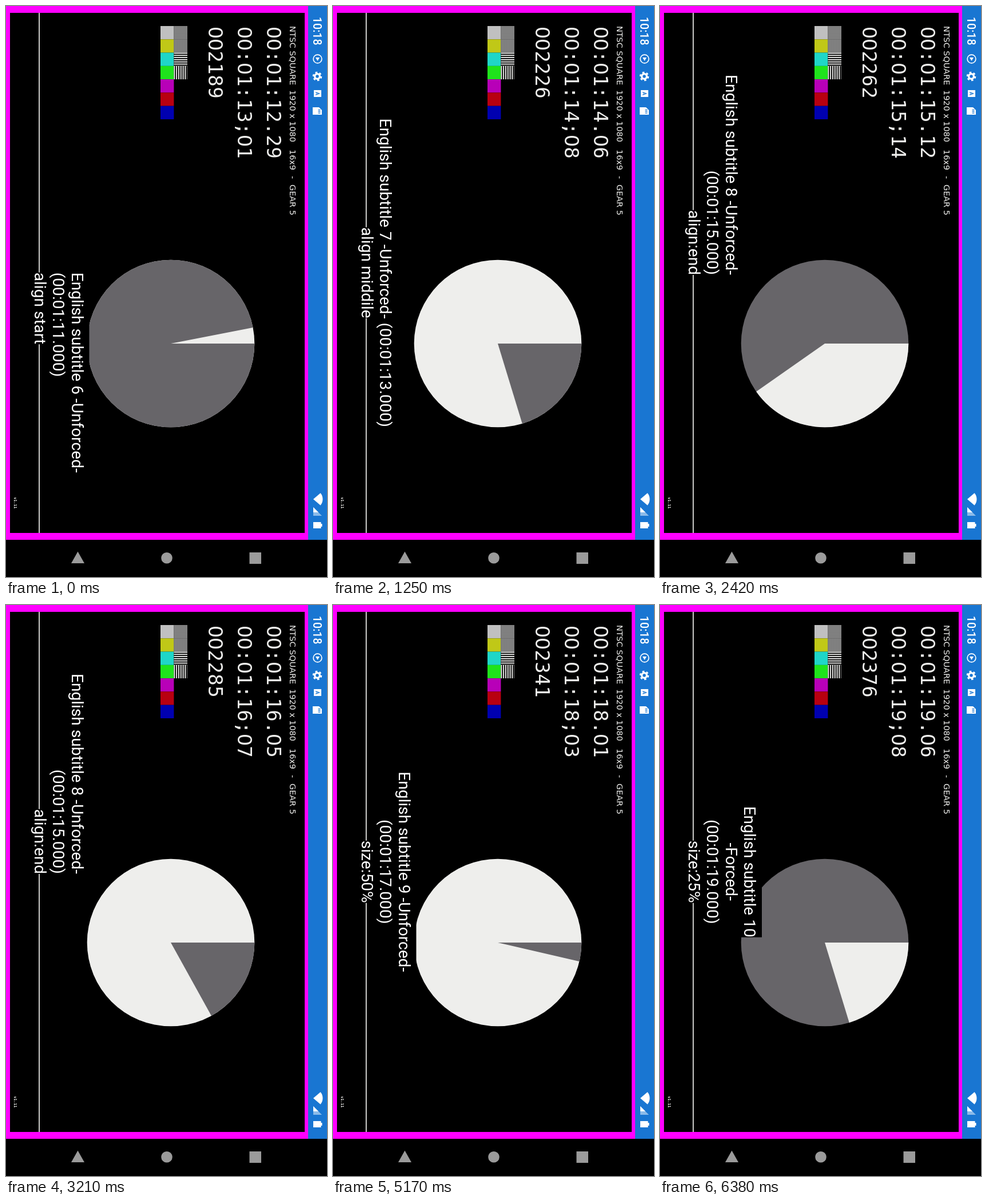
Recreate the animation shown at these times as an HTML page with a canvas. Size 561 by 998 pixels, loop 6.42 s.

```html
<!DOCTYPE html>
<html>
<head>
<meta charset="utf-8">
<style>
  html, body { margin: 0; width: 561px; height: 998px; overflow: hidden; background: #000; }
  canvas { display: block; }
</style>
</head>
<body>
<canvas id="stage" width="561" height="998"></canvas>
<script>
const ctx = document.getElementById('stage').getContext('2d');
const LOOP = 6420, TAU = Math.PI * 2;
const PALE = '#eeeeec', GREY = '#676569', BLUE = '#1976d2', NAV = '#9b9b9b';
const SANS = '"DejaVu Sans", sans-serif', MONO = '"DejaVu Sans Mono", monospace';

// Playback pace: time in ms, video frame number
const pace = [[0, 2189], [1250, 2226], [2420, 2262], [3210, 2285],
  [4340, 2315], [5170, 2341], [6380, 2376], [6420, 2377]];

// Subtitles change every two seconds of video, starting at 71 s
const subtitles = [
  { align: 'left', lines: ['English subtitle 6 -Unforced-', '(00:01:11.000)', 'align start'] },
  { align: 'center', lines: ['English subtitle 7 -Unforced- (00:01:13.000)', 'align middile'] },
  { align: 'right', lines: ['English subtitle 8 -Unforced-', '(00:01:15.000)', 'align:end'] },
  { align: 'center', lines: ['English subtitle 9 -Unforced-', '(00:01:17.000)', 'size:50%'] },
  { align: 'center', lines: ['English subtitle 10', '-Forced-', '(00:01:19.000)', 'size:25%'] }
];

function box(x, y, w, h, color) {
  ctx.fillStyle = color;
  ctx.fillRect(x, y, w, h);
}

function shape(color, ...points) {
  ctx.fillStyle = color;
  ctx.beginPath();
  points.forEach(p => ctx.lineTo(...p));
  ctx.fill();
}

function disc(x, y, r, color, from = 0, to = TAU) {
  ctx.fillStyle = color;
  ctx.beginPath();
  if (to - from < TAU) ctx.moveTo(x, y);
  ctx.arc(x, y, r, from, to);
  ctx.fill();
}

function ring(x, y, r, width, color, dash = []) {
  ctx.strokeStyle = color;
  ctx.lineWidth = width;
  ctx.setLineDash(dash);
  ctx.beginPath();
  ctx.arc(x, y, r, 0, TAU);
  ctx.stroke();
  ctx.setLineDash([]);
}

// Text reads downwards: x is its baseline, y its anchor
function text(str, x, y, font, color = PALE, align = 'left') {
  ctx.save();
  ctx.transform(0, 1, -1, 0, x, y);
  ctx.font = font;
  ctx.fillStyle = color;
  ctx.textAlign = align;
  ctx.fillText(str, 0, 0);
  ctx.restore();
}

// Monospaced figures, but with a plain zero
function counter(str, x) {
  [...str].forEach((c, i) =>
    text(c, x, 46.5 + i * 21, '34px ' + (c === '0' ? SANS : MONO), PALE, 'center'));
}

function timecode(n, mark) {
  const pad = v => String(v).padStart(2, '0');
  const s = Math.floor(n / 30);
  return `00:${pad(Math.floor(s / 60))}:${pad(s % 60)}${mark}${pad(n % 30)}`;
}

function frameAt(t) {
  const i = Math.max(1, pace.findIndex(p => p[0] > t));
  const [t0, n0] = pace[i - 1], [t1, n1] = pace[i];
  return Math.floor(n0 + (n1 - n0) * (t - t0) / (t1 - t0) + 0.01);
}

function statusBar() {
  box(528, 0, 33, 933, BLUE);
  text('10:18', 537, 19, '500 19.5px Roboto, sans-serif', '#fff');
  ring(544.5, 92.5, 7.4, 1.7, '#fff');
  shape('#fff', [548, 90], [541, 90], [544.5, 96]);
  ring(544, 123, 4.4, 3.4, '#fff');
  ring(544, 123, 6.9, 2.8, '#fff', [3.61, 3.61]);
  box(538, 147, 13, 12, '#fff');
  text('A', 541, 153, 'bold 9px Roboto, sans-serif', BLUE, 'center');
  shape('#fff', [536, 177], [547, 177], [552, 182], [552, 190], [536, 190]);
  for (let i = 0; i < 3; i++) box(545.5, 181 + i * 2.7, 4, 1.3, BLUE);
  disc(537, 862, 16.5, '#fff', -0.7, 0.7);
  shape('#8cbbe9', [537, 876], [552, 891], [537, 891]);
  shape('#fff', [537, 876], [546, 885], [537, 885]);
  box(537, 902, 13.5, 11, '#fff');
  box(550, 905, 2.5, 5, '#fff');
}

function navBar() {
  shape(NAV, [125.5, 953.5], [137, 974], [114, 974]);
  disc(281, 964.8, 9.8, NAV);
  box(425.5, 955, 20.5, 20, NAV);
}

function testPatterns() {
  const bars = ['#c0c0c0', '#c0c817', '#1fd6c8', '#1fe31c', '#b800b8', '#b80010', '#0000b0'];
  const cell = 163 / 7;
  bars.forEach((c, i) => box(270, 35 + i * cell, 23.4, cell, c));
  for (let i = 0; i < 4; i++) {
    const top = 35 + i * cell, fine = i < 2, step = fine ? 1.9 : 3.8;
    box(293.4, top, 23.6, cell, fine ? '#747474' : '#000');
    for (let d = 0; d < cell; d += step) {
      const color = fine ? '#8c8c8c' : PALE, w = Math.min(step / 2, cell - d);
      if (i % 2) box(293.4 + d, top, w, cell, color);
      else box(293.4, top + d, 23.6, w, color);
    }
  }
}

function pie(n) {
  const even = Math.floor(n / 30) % 2 === 0;
  const sweep = (n % 30 / 30 + 1 / 360) * TAU;
  disc(288, 590, 146.3, even ? PALE : GREY);
  disc(288, 590, 146.3, even ? GREY : PALE, 0, sweep);
}

function subtitle(n) {
  const size = 28.1, step = 32.5, font = size + 'px Roboto, sans-serif';
  const i = Math.min(4, Math.max(0, Math.floor((n / 30 - 71) / 2)));
  const { align, lines } = subtitles[i];
  const anchor = { left: 465.7, center: 466.2, right: 470 }[align];
  const shift = { left: 0, center: 0.5, right: 1 }[align];
  ctx.font = font;
  const rows = lines.map((str, k) => ({
    str, x: 49.5 + (lines.length - 1 - k) * step, w: ctx.measureText(str).width
  }));
  rows.forEach(({ x, w }, k) => {
    const up = k ? 26 : 31, down = 7;
    box(x - down, anchor - w * shift, up + down, w, '#000');
  });
  rows.forEach(({ str, x }) => text(str, x, anchor, font, '#fff', align));
}

function video(n) {
  box(0, 0, 528, 933, '#f0f');
  box(7, 12, 515, 909, '#000');
  box(57.2, 12, 1.7, 909, PALE);
  [['NTSC SQUARE', 35], ['1920 x 1080', 147], ['16x9', 251], ['-', 297], ['GEAR 5', 312]]
    .forEach(([str, y]) => text(str, 495.5, y, '14.4px ' + SANS));
  counter(timecode(n, '.'), 455.5);
  counter(timecode(n + 2, ';'), 404.5);
  counter(String(n).padStart(6, '0'), 353.5);
  testPatterns();
  text('v1.11', 13.5, 858.5, 'bold 6.6px ' + MONO);
  pie(n);
  subtitle(n);
}

function draw(now) {
  box(0, 0, 561, 998, '#000');
  video(frameAt(now % LOOP));
  statusBar();
  navBar();
}

const start = performance.now();
function tick() {
  draw(performance.now() - start);
  requestAnimationFrame(tick);
}
tick();
</script>
</body>
</html>
```
